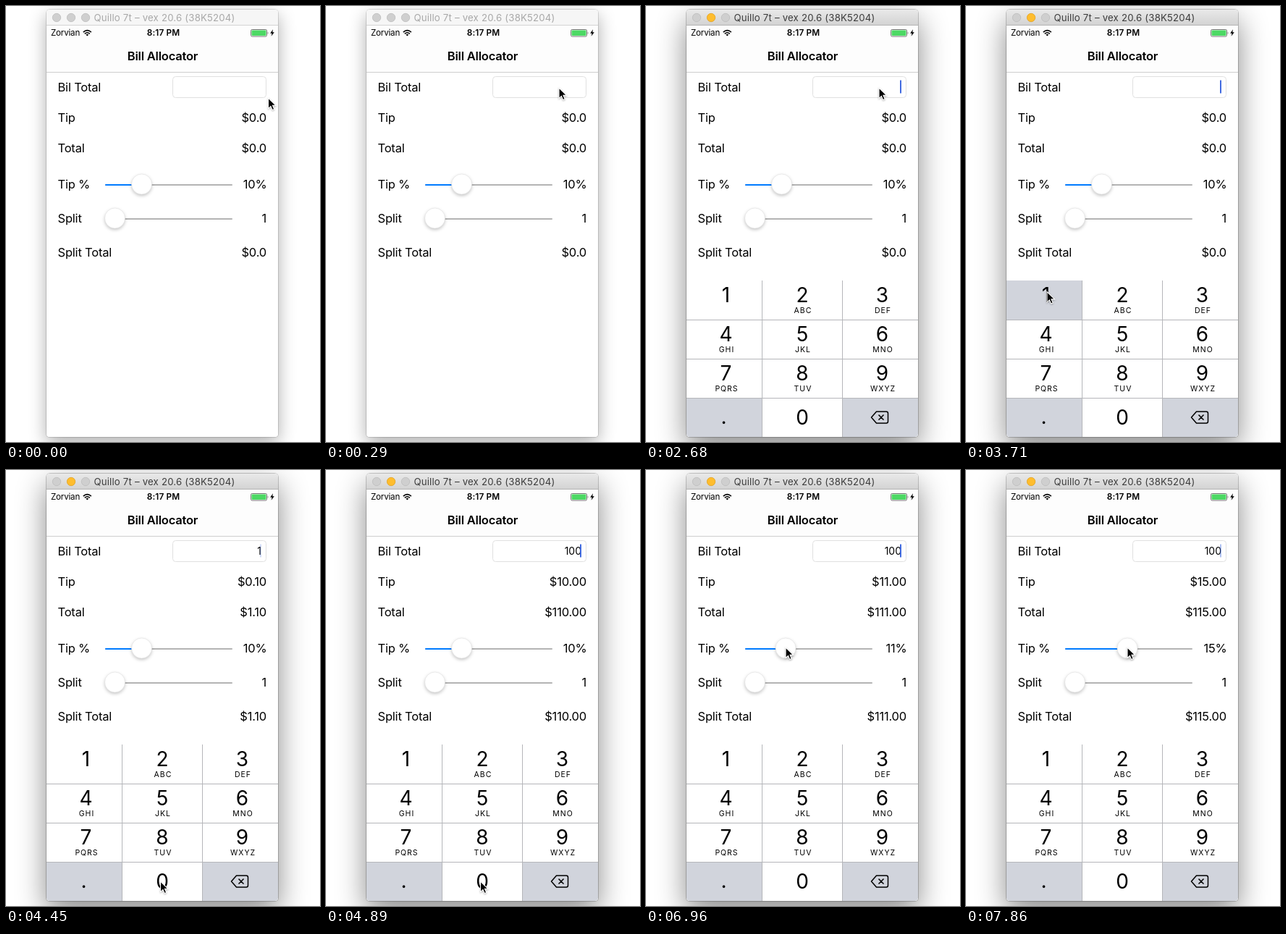
Write an HTML page that moves like this. It is 434 px wide and 602 px high and loops after 8000 ms.

```html
<!DOCTYPE html>
<html lang="en">
<head>
<meta charset="utf-8">
<title>Bill splitter</title>
<style>
  html, body { margin: 0; width: 100%; height: 100%; overflow: hidden; background: #fff; }
  #stage { position: relative; width: 434px; height: 602px; overflow: hidden; }
  #shadow {
    position: absolute; left: 56px; top: 5px; width: 320px; height: 590px;
    border-radius: 5px 5px 4px 4px;
    box-shadow: 0 0 0 1px rgba(0,0,0,.13), 0 8px 24px rgba(0,0,0,.33);
  }
  svg { position: absolute; left: 0; top: 0; font: 16.5px Inter, sans-serif; letter-spacing: -.2px; }
  .mid { text-anchor: middle; }
  .end { text-anchor: end; }
  .semi { font-weight: 600; }
  .bar { fill: #f6f6f6; }
  .rule { fill: #d4d4d4; }
  .dot { fill: #cfcfcf; stroke: #bdbdbd; stroke-width: .8; }
  .name { font-size: 13.2px; letter-spacing: .2px; fill: #a8a8a8; }
  .active #shadow { box-shadow: 0 0 0 1px rgba(0,0,0,.2), 0 15px 40px rgba(0,0,0,.47); }
  .active .bar { fill: url(#chrome); }
  .active .rule { fill: #b4b4b4; }
  .active .name { fill: #3c3c3c; }
  .active .dot.warm { fill: #ffbd2e; stroke: #e0a123; }
  .status { font-size: 11.6px; }
  .clock { font-size: 11.8px; letter-spacing: .1px; }
  .thumb { fill: #fff; stroke: #dedede; stroke-width: .6; filter: drop-shadow(0 2.5px 2px rgba(0,0,0,.22)); }
  .track { fill: #b4b4b4; }
  .digit { font-size: 28px; letter-spacing: 0; }
  .letters { font-size: 10.5px; letter-spacing: 1px; }
  .key { fill: #fff; }
  .key.dark { fill: #d1d4dc; }
  .line { fill: #b5b6ba; }
</style>
</head>
<body>
<div id="stage">
  <div id="shadow"></div>
  <svg width="434" height="602" viewBox="0 0 434 602">
    <defs>
      <linearGradient id="chrome" x2="0" y2="1">
        <stop stop-color="#e9e9e9"/><stop offset="1" stop-color="#d2d2d2"/>
      </linearGradient>
      <clipPath id="frame"><rect x="56" y="5" width="320" height="590" rx="4.5"/></clipPath>
    </defs>

    <g clip-path="url(#frame)">
      <rect x="56" y="5" width="320" height="590" fill="#fff"/>

      <rect class="bar" x="56" y="5" width="320" height="22"/>
      <rect class="rule" x="56" y="26" width="320" height="1"/>
      <circle class="dot" cx="70" cy="16" r="5.7"/>
      <circle class="dot warm" cx="90" cy="16" r="5.7"/>
      <circle class="dot" cx="110" cy="16" r="5.7"/>
      <text class="name mid" x="219" y="20.7">Quillo 7t – vex 20.6 (38K5204)</text>

      <rect x="56" y="27" width="320" height="64" fill="#fdfdfd"/>
      <rect x="56" y="91" width="320" height="1" fill="#cfcfcf"/>
      <text class="status" x="62" y="41.3">Zorvian</text>
      <g fill="none" stroke="#000" stroke-width="1.6">
        <path d="M106.8 36.1Q112.3 31.2 117.8 36.1M108.8 38.3Q112.3 35.2 115.8 38.3"/>
        <path d="M110.4 39.6Q112.3 38 114.2 39.6L112.3 41.6Z" fill="#000" stroke="none"/>
      </g>
      <text class="clock semi mid" x="217.5" y="41.3">8:17 PM</text>
      <rect x="338.5" y="32.5" width="22" height="9.6" rx="1.8" fill="#fff" stroke="#555" stroke-width=".8"/>
      <rect x="339.5" y="33.5" width="20" height="7.6" rx="1" fill="#4cd964"/>
      <path d="M361.8 35.6q1.4 1.7 0 3.4z" fill="#333"/>
      <path d="M369 32.2L365.2 37.8H367.6L366.6 41.8L370.8 36.2H368.3Z"/>
      <text class="semi mid" x="216.5" y="75">Bill Allocator</text>

      <text x="71.5" y="118">Bil Total</text>
      <text x="71.5" y="160">Tip</text>
      <text x="71.5" y="202">Total</text>
      <text x="71.5" y="252">Tip %</text>
      <text x="71.5" y="299">Split</text>
      <text x="71.5" y="346">Split Total</text>

      <rect x="230.5" y="97.5" width="129" height="29" rx="4" fill="#fff" stroke="#e0e0e0"/>
      <text id="bill" class="end" x="353" y="117" style="font-size:14px;letter-spacing:0"></text>
      <rect id="caret" x="351" y="102.5" width="2" height="18" fill="#416be0"/>
      <text id="tip" class="end" x="360" y="160"></text>
      <text id="total" class="end" x="360" y="202"></text>
      <text id="rate" class="end" x="360.5" y="252"></text>
      <text class="end" x="360" y="299">1</text>
      <text id="share" class="end" x="360" y="346"></text>

      <rect class="track" x="137" y="246" width="176" height="2" rx="1"/>
      <rect id="fill" x="137" y="246" height="2" rx="1" fill="#007aff"/>
      <circle id="thumb" class="thumb" cy="246" r="14"/>
      <rect class="track" x="137" y="293" width="176" height="2" rx="1"/>
      <circle class="thumb" cx="150.5" cy="293" r="14"/>

      <g id="pad"></g>
    </g>
    <path id="cursor" d="M0 0V14.6L3.4 11.4L5.7 16.6L8.2 15.5L6 10.4H10.6Z"
      stroke="#fff" stroke-width="1.1" style="filter:drop-shadow(0 1px 1px rgba(0,0,0,.3))"/>
  </svg>
</div>

<script>
const LOOP = 8000, TICKS = 54;
const $ = id => document.getElementById(id);
const clamp = v => Math.max(0, Math.min(1, v));
const smooth = v => v * v * (3 - 2 * v);

function buildPad() {
  const labels = ['1', '2 ABC', '3 DEF', '4 GHI', '5 JKL', '6 MNO', '7 PQRS', '8 TUV', '9 WXYZ', '.', '0', ''];
  const left = [56, 160, 271], width = [104, 111, 105], center = [110.5, 216, 326.5];
  let keys = '', lines = '', text = '';
  labels.forEach((label, n) => {
    const col = n % 3, row = Math.floor(n / 3), y = 379 + row * 54;
    const [digit, letters = ''] = label.split(' ');
    const dark = n === 9 || n === 11 ? ' dark' : '';
    keys += `<rect id="key${n}" class="key${dark}" x="${left[col]}" y="${y}" width="${width[col]}" height="54"/>`;
    text += n === 9
      ? '<text class="digit mid" x="107.5" y="576.5">.</text>'
      : `<text class="digit mid" x="${center[col]}" y="${n === 10 ? 578.3 : y + 30.3}">${digit}</text>`;
    text += `<text class="letters mid" x="${center[col] + 1}" y="${y + 45}">${letters}</text>`;
  });
  for (const y of [433, 487, 541]) lines += `<rect class="line" x="56" y="${y}" width="320" height="1"/>`;
  for (const x of [160, 271]) lines += `<rect class="line" x="${x}" y="379" width="1" height="216"/>`;
  const erase = '<path d="M318.5 560H332Q334.5 560 334.5 562.5V573.5Q334.5 576 332 576H318.5L311.5 568Z' +
    'M321.5 564.5L328.5 571.5M328.5 564.5L321.5 571.5" fill="none" stroke="#000" stroke-width="1.5" stroke-linejoin="round"/>';
  $('pad').innerHTML = keys + lines + text + erase;
}

// pointer stops: tick, x, y
const stops = [
  [0, 362.5, 127], [2, 322, 113], [18, 322, 113], [24, 112, 394.5], [26, 112, 394.5],
  [29, 206, 585], [30, 213.5, 568], [34, 213.5, 568], [40, 154, 296], [41, 154, 296],
  [44, 187.5, 245], [45, 187.5, 245], [53, 223, 245]
];

function pointer(k) {
  const n = Math.max(1, stops.findIndex(s => s[0] >= k));
  const [a, ax, ay] = stops[n - 1], [b, bx, by] = stops[n];
  const p = smooth((k - a) / (b - a));
  return [ax + (bx - ax) * p, ay + (by - ay) * p];
}

function caretAlpha(ms) {
  const p = (ms / 1000) % 1;
  return p < .5 ? 1 : p < .9 ? clamp((.62 - p) / .12) : clamp((p - .93) / .08);
}

function draw(t) {
  // the screen refreshes in even ticks
  const k = Math.min(TICKS - 1, Math.floor(t * TICKS / LOOP + .056));
  const now = k * LOOP / TICKS;
  const [x, y] = pointer(k);
  $('cursor').setAttribute('transform', `translate(${x} ${y})`);
  $('stage').classList.toggle('active', k >= 12);

  const rise = 1 - (1 - clamp((now - 2170) / 360)) ** 3;
  $('pad').setAttribute('transform', `translate(0 ${216 * (1 - rise)})`);
  $('key0').classList.toggle('dark', k === 25);
  $('key10').classList.toggle('dark', k === 31 || k === 32);

  const typed = k < 26 ? '' : k < 32 ? '1' : k < 33 ? '10' : '100';
  const lastInput = (k < 26 ? 15 : k < 32 ? 26 : k < 33 ? 32 : 33) * LOOP / TICKS;
  $('caret').setAttribute('opacity', k < 15 ? 0 : caretAlpha(now - lastInput));
  $('bill').textContent = typed;

  const knob = k < 45 ? 187.5 : x;
  const rate = Math.round(5 + (knob - 151) / 148 * 20);
  const tip = typed * rate / 100;
  const money = v => '$' + (typed ? v.toFixed(2) : '0.0');
  $('thumb').setAttribute('cx', knob);
  $('fill').setAttribute('width', knob - 137);
  $('rate').textContent = rate + '%';
  $('tip').textContent = money(tip);
  $('total').textContent = $('share').textContent = money(+typed + tip);
}

buildPad();
const start = performance.now();
function loop() {
  draw((performance.now() - start) % LOOP);
  requestAnimationFrame(loop);
}
loop();
</script>
</body>
</html>
```
